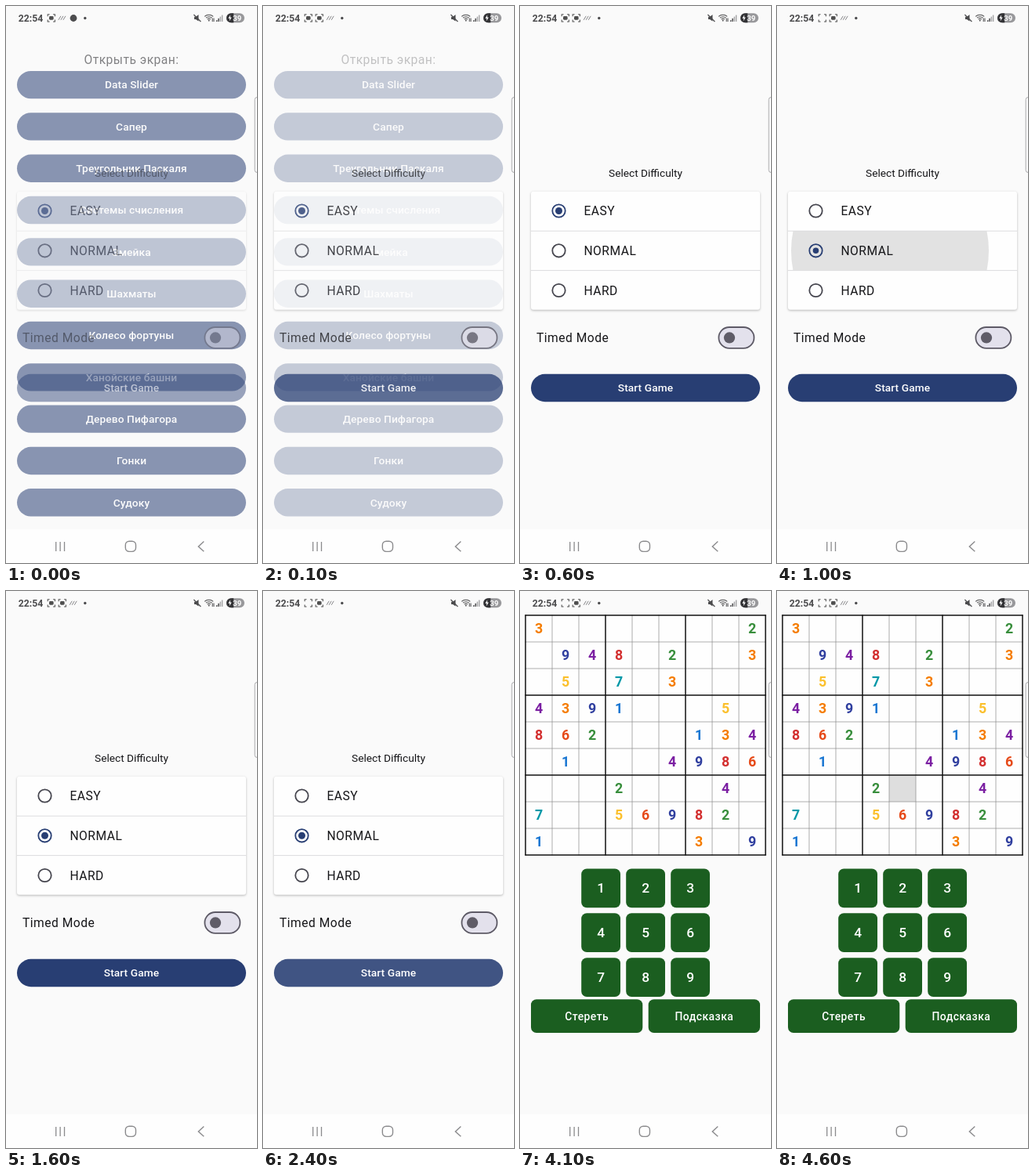
Animation of 320x711 px, one loop 5000 ms. Source, as an HTML page with a canvas:

```html
<!DOCTYPE html>
<html lang="ru">
<head>
<meta charset="utf-8">
<title>Sudoku demo</title>
<style>
  html, body { margin: 0; width: 100%; height: 100%; overflow: hidden; background: #fafafa; }
  canvas { display: block; width: 320px; height: 711px; }
</style>
</head>
<body>
<canvas id="stage"></canvas>
<script>
const W = 320, H = 711, LOOP = 5000, STEP = 100;
const NAVY = '#283e73', GREEN = '#1b5e20', BG = '#fafafa', INK = '#161619';
const dpr = window.devicePixelRatio || 1;

const MENU = ['Data Slider', 'Сапер', 'Треугольник Паскаля', 'Системы счисления',
  'Змейка', 'Шахматы', 'Колесо фортуны', 'Ханойские башни',
  'Дерево Пифагора', 'Гонки', 'Судоку'];
const LEVELS = ['EASY', 'NORMAL', 'HARD'];
const LEVEL_Y = [261.5, 312.3, 363];
const BOARD = ['3.......2', '.948.2..3', '.5.7.3...',
  '4391...5.', '862...134', '.1...4986',
  '...2...4.', '7..56982.', '1.....3.9'];
const DIGITS = ['', '#1976d2', '#388e3c', '#f57c00', '#7b1fa2', '#fbc02d',
  '#e64a19', '#0097a7', '#d32f2f', '#303f9f'];
// Times at which the recording icon is hidden
const BLINK_OFF = [[1000, 1500], [2100, 2600], [3200, 3500], [4100, 5000]];

function setup(canvas) {
  canvas.width = W * dpr;
  canvas.height = H * dpr;
  const c = canvas.getContext('2d');
  c.scale(dpr, dpr);
  return c;
}
const screen = setup(document.getElementById('stage'));
const buffer = setup(document.createElement('canvas'));
let g = screen;

const clamp = x => Math.max(0, Math.min(1, x));
const lerp = (a, b, p) => a + (b - a) * p;
const progress = (t, start, length) => clamp((t - start) / length);

// cubic-bezier(.4, 0, .2, 1)
function standardEase(x) {
  let lo = 0, hi = 1;
  for (let i = 0; i < 24; i++) {
    const s = (lo + hi) / 2, q = 1 - s;
    if (1.2 * s * q * q + 0.6 * s * s * q + s * s * s < x) lo = s; else hi = s;
  }
  return lo * lo * (3 - 2 * lo);
}

function box(x, y, w, h, r, fill, stroke, width) {
  g.beginPath();
  g.roundRect(x, y, w, h, r);
  if (fill) { g.fillStyle = fill; g.fill(); }
  if (stroke) { g.strokeStyle = stroke; g.lineWidth = width; g.stroke(); }
}

function disc(x, y, r, fill) {
  g.beginPath();
  g.arc(x, y, r, 0, 7);
  g.fillStyle = fill;
  g.fill();
}

function line(points, color, width) {
  g.beginPath();
  points.forEach(([x, y], i) => i ? g.lineTo(x, y) : g.moveTo(x, y));
  g.strokeStyle = color;
  g.lineWidth = width;
  g.stroke();
}

// y is the middle of the capital letters
function text(s, x, y, { size = 13.7, weight = 400, color = INK, align = 'center', gap = 0 } = {}) {
  g.font = `${weight} ${size}px Roboto, sans-serif`;
  g.letterSpacing = gap + 'px';
  g.textAlign = align;
  g.fillStyle = color;
  g.fillText(s, x, y + size * 0.356);
}

function clipped(x, y, w, h, r, draw) {
  g.save();
  g.beginPath();
  g.roundRect(x, y, w, h, r);
  g.clip();
  draw();
  g.restore();
}

function layer(draw, alpha) {
  if (alpha <= 0) return;
  g = buffer;
  g.clearRect(0, 0, W, H);
  draw();
  g = screen;
  g.save();
  g.globalAlpha = alpha;
  g.drawImage(buffer.canvas, 0, 0, W, H);
  g.restore();
}

function pill(label, y) {
  box(14, y, 292, 35.4, 17.7, NAVY);
  text(label, 160, y + 17.6, { weight: 500, color: '#fff', gap: 0.1 });
}

function drawMenu() {
  text('Открыть экран:', 160, 68, { size: 15.6, gap: 0.5, color: '#1b1b1f' });
  MENU.forEach((label, i) => pill(label, 82.9 + i * 53.32));
}

function drawRadio(y, dot) {
  const color = dot ? NAVY : '#46464f';
  g.beginPath();
  g.arc(49.5, y, 8.2, 0, 7);
  g.strokeStyle = color;
  g.lineWidth = 1.8;
  g.stroke();
  if (dot) disc(49.5, y, dot, color);
}

function drawSetup(t) {
  text('Select Difficulty', 160, 212.8);
  g.save();
  g.shadowColor = 'rgba(0,0,0,.28)';
  g.shadowBlur = 3 * dpr;
  g.shadowOffsetY = dpr;
  box(14, 236.8, 292, 151, 3, '#fefefe');
  g.restore();

  const spread = progress(t, 850, 250);
  const fade = 1 - progress(t, 1100, 300);
  if (spread && fade) clipped(14, 287, 292, 50.5, 0, () =>
    disc(lerp(120, 160, spread), 312.3, lerp(45, 180, spread), `rgba(0,0,0,${0.11 * fade})`));

  for (const y of [287.2, 337.6]) line([[14, y], [306, y]], '#dcdcde', 1);
  const chosen = t < 900 ? 0 : 1;
  const dot = chosen ? lerp(3, 4.5, progress(t, 900, 200)) : 4.5;
  LEVELS.forEach((label, i) => {
    drawRadio(LEVEL_Y[i], i === chosen ? dot : 0);
    text(label, 81.5, LEVEL_Y[i], { size: 15.6, gap: 0.5, align: 'left' });
  });

  text('Timed Mode', 21, 423.5, { size: 15.6, gap: 0.5, align: 'left' });
  box(253.4, 410, 45, 26.8, 13.4, '#e3e1ec', '#5d5a66', 1.8);
  disc(267, 423.4, 7.1, '#5f5c67');

  pill('Start Game', 469.8);
  const press = progress(t, 2150, 250);
  if (press) clipped(14, 469.8, 292, 35.4, 17.7, () =>
    disc(160, 487.5, lerp(45, 165, press), 'rgba(255,255,255,.115)'));
}

function greenButton(label, x, y, w, h, size, gap) {
  box(x, y, w, h, 7, GREEN);
  text(label, x + w / 2, y + h / 2, { size, gap, weight: 500, color: '#fff' });
}

function drawSudoku(t) {
  const x0 = 7, y0 = 31, cell = 34, side = cell * 9;
  box(x0, y0, side, side, 0, '#fefefe');
  if (t >= 4300) {
    const x = x0 + 4 * cell, y = y0 + 6 * cell;
    box(x, y, cell, cell, 0, '#dedede');
    box(x, y, cell, cell, 0, `rgba(0,0,0,${0.1 * (1 - progress(t, 4300, 300))})`);
  }
  for (const thick of [false, true]) {
    for (let i = 0; i <= 9; i++) {
      if ((i % 3 === 0) !== thick) continue;
      const d = i * cell, color = thick ? '#111' : '#8c8c8c', width = thick ? 1.5 : 0.7;
      line([[x0 + d, y0 - 0.6], [x0 + d, y0 + side + 0.6]], color, width);
      line([[x0 - 0.6, y0 + d], [x0 + side + 0.6, y0 + d]], color, width);
    }
  }
  BOARD.forEach((row, r) => [...row].forEach((n, c) => {
    if (n !== '.') text(n, x0 + (c + 0.5) * cell, y0 + (r + 0.5) * cell,
      { size: 17.8, weight: 700, color: DIGITS[n] });
  }));
  for (let i = 0; i < 9; i++) {
    greenButton(String(i + 1), 78.2 + (i % 3) * 57, 354.4 + Math.floor(i / 3) * 56.9, 49.8, 49.8, 17.4, 0);
  }
  greenButton('Стереть', 14, 521.3, 142.3, 42.7, 13.9, 0.45);
  greenButton('Подсказка', 163.7, 521.3, 142.3, 42.7, 13.9, 0.45);
}

function captureIcon(x, filled) {
  const y = 15.4, r = 4.6, k = 2.4;
  for (const sx of [-1, 1]) for (const sy of [-1, 1]) {
    line([[x + sx * (r - k), y + sy * r], [x + sx * r, y + sy * r], [x + sx * r, y + sy * (r - k)]], '#555', 1.1);
  }
  if (filled) box(x - 2.8, y - 2.3, 5.6, 4.6, 1.4, '#505050');
}

function drawStatus(t) {
  const ink = '#4c4c4e';
  text('22:54', 15.8, 15.4, { size: 12.2, weight: 700, color: ink, align: 'left' });
  const early = t < 100;
  const recording = !BLINK_OFF.some(([a, b]) => t >= a && t < b);
  captureIcon(57.8, recording);
  if (early) disc(86, 15.5, 4.4, ink);
  else captureIcon(71.8, true);
  const sx = early ? 71.5 : 85.8;
  for (let i = -1; i <= 1; i++) {
    line([[sx + i * 3 - 1.6, 17.8], [sx + i * 3 + 1.4, 12.8]], '#77777a', 0.9);
  }
  disc(100.8, 15.5, 1.7, ink);

  // muted speaker
  g.beginPath();
  g.moveTo(240, 13.7); g.lineTo(242, 13.7); g.lineTo(245.5, 11);
  g.lineTo(245.5, 19.6); g.lineTo(242, 17); g.lineTo(240, 17);
  g.fillStyle = ink;
  g.fill();
  line([[239.4, 11], [248.4, 20]], ink, 1.2);

  // wireless and signal strength
  g.strokeStyle = ink;
  g.lineWidth = 1.1;
  for (const r of [2.8, 5.3, 7.8]) {
    g.beginPath();
    g.arc(258.7, 19, r, -2.35, -0.79);
    g.stroke();
  }
  disc(258.7, 18.6, 1, ink);
  line([[263.2, 15.5], [263.2, 20]], ink, 1);
  line([[265, 15.5], [265, 20]], ink, 1);
  for (let i = 0; i < 4; i++) {
    box(268 + i * 2.3, 18 - i * 2.2, 1.5, 2 + i * 2.2, 0.4, i < 2 ? ink : '#a5a5a7');
  }

  // battery
  clipped(281, 9.2, 23, 12, 6, () => {
    box(281, 9, 23, 13, 0, '#98989b');
    box(281, 9, 9.2, 13, 0, '#333336');
  });
  g.beginPath();
  g.moveTo(286.2, 11.2); g.lineTo(283.3, 15.8); g.lineTo(285.3, 15.8);
  g.lineTo(284.7, 19.2); g.lineTo(287.7, 14.5); g.lineTo(285.7, 14.5);
  g.fillStyle = '#fff';
  g.fill();
  text('39', 294.8, 15.3, { size: 9.6, weight: 700, color: '#fff' });
}

function drawChrome() {
  box(317.2, 116.5, 8, 96, 3, '#fdfdfd', '#a9a9ac', 1);
  box(0, 668, W, H - 668, 0, '#fefefe');
  const gray = '#8b8b8d';
  for (const x of [63.7, 69.1, 74.5]) line([[x, 684], [x, 696]], gray, 1.3);
  box(152.3, 683.2, 13.2, 13.2, 4.8, null, gray, 1.4);
  line([[252.3, 683.6], [245.3, 689.9], [252.3, 696.2]], gray, 1.4);
}

function render(t) {
  g = screen;
  box(0, 0, W, H, 0, BG);
  if (t < 2600) {
    const shown = standardEase(progress(t, -235, 700));
    layer(drawMenu, 1 - shown);
    layer(() => drawSetup(t), shown);
  } else {
    drawSudoku(t);
  }
  drawStatus(t);
  drawChrome();
}

const start = performance.now();
function tick() {
  const t = (performance.now() - start) % LOOP;
  render(Math.floor(t / STEP) * STEP);
  requestAnimationFrame(tick);
}
tick();
</script>
</body>
</html>
```
